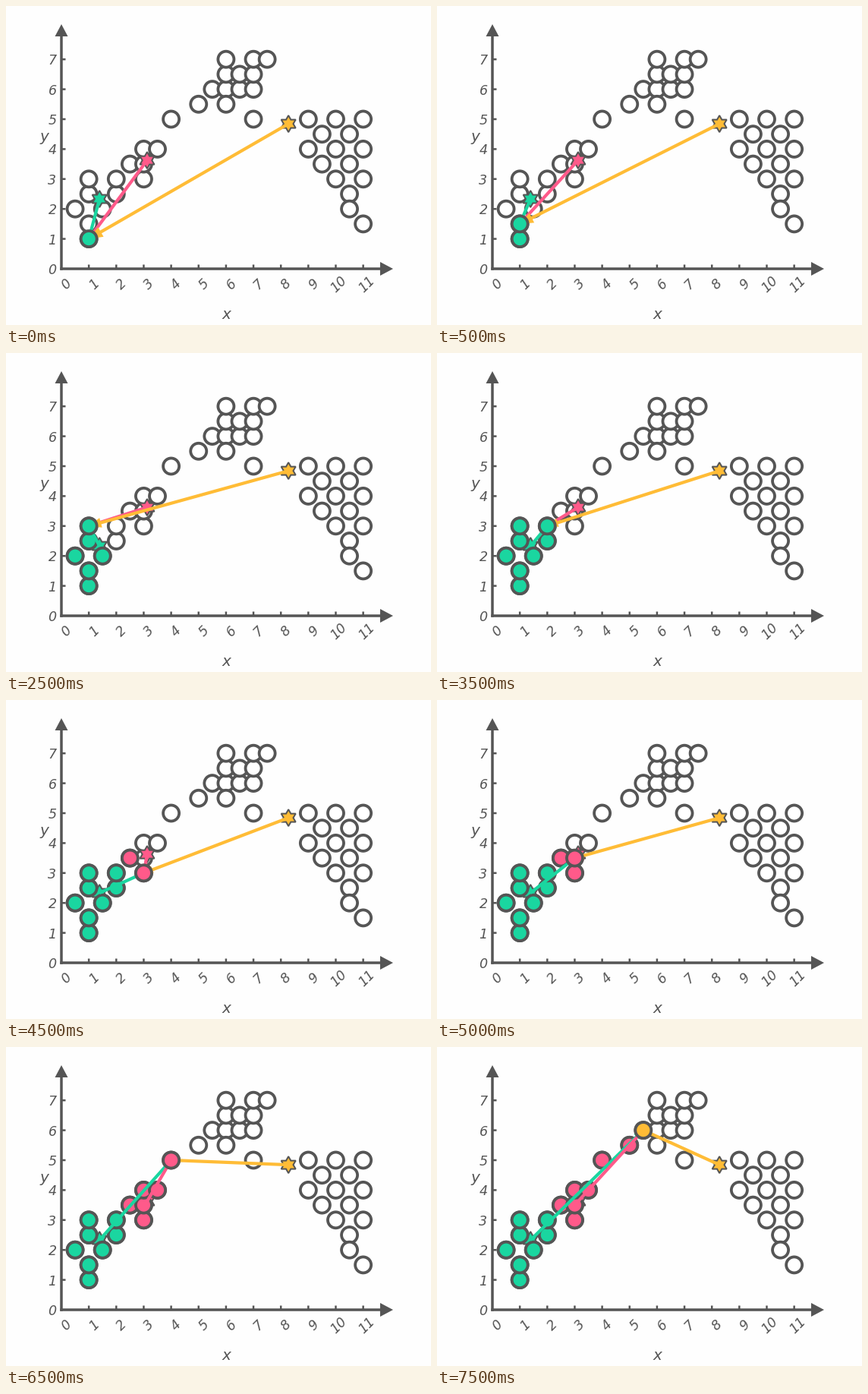
Write a matplotlib script that moves like this. It is 560 by 420 pixels and loops after 8000 ms.

```python
from itertools import product

import numpy as np
import matplotlib.pyplot as plt
from matplotlib.animation import FuncAnimation
from matplotlib.patches import Circle, Polygon

W, H, DPI = 560, 420, 100
PT = 72 / DPI
INK = "#555555"
COLORS = ["#1AD6A0", "#FF5A8A", "#FFBC36"]

fig = plt.figure(figsize=(W / DPI, H / DPI), dpi=DPI, facecolor="#FEFEFE")
ax = fig.add_axes([0, 0, 1, 1])
ax.set(xlim=(0, W), ylim=(H, 0))
ax.axis("off")


def to_px(point):
    return np.array([73, 346]) + np.array([36.15, -39.4]) * point


def write(text, x, y, size=17.5, angle=0):
    ax.text(x, y, text, fontsize=size * PT, color=INK, rotation=angle,
            family="DejaVu Sans", style="italic", ha="center",
            va="center_baseline", rotation_mode="anchor")


def bar(x0, y0, x1, y1, width):
    ax.plot([x0, x1], [y0, y1], color=INK, lw=width * PT, zorder=1,
            solid_capstyle="butt", snap=False)


def disc(point, color, z):
    return ax.add_patch(Circle(to_px(point), 10.5, fc=color, ec=INK,
                               lw=3.8 * PT, zorder=z))


def star(center, color):
    a = np.arange(12) * np.pi / 6
    r = np.where(np.arange(12) % 2, 6.3, 11)
    pts = center + np.c_[r * np.sin(a), -r * np.cos(a)]
    ax.add_patch(Polygon(pts, fc=color, ec=INK, lw=2 * PT, zorder=3))


def arrow_shape(start, end):
    """Arrow outline; the head grows with the length."""
    d = end - start
    length = np.hypot(*d)
    d = d / length
    n = np.array([-d[1], d[0]])
    neck, half = end - d * 0.06 * length, 2.1
    wing = max(half, 0.024 * length)
    return np.array([start + n * half, neck + n * half, neck + n * wing, end,
                     neck - n * wing, neck - n * half, start - n * half])


def column(x, low, high):
    return [(x, y) for y in np.arange(low, high + 0.1, 0.5)]


# Axes
bar(73, 347.7, 73, 38, 3.5)
bar(71.3, 346, 496, 346, 3.5)
for tip, along in (((73, 24), (0, 16)), ((510, 346), (-17, 0))):
    tip, along = np.array(tip), np.array(along)
    side = along[::-1] * 0.53
    ax.add_patch(Polygon([tip, tip + along + side, tip + along - side], fc=INK, lw=0))
for i in range(12):
    x, y = to_px((i, i))
    write(str(i), x + (5.5 if i < 10 else 3), 365, angle=45)
    if i:
        bar(x, 346, x, 340.5, 2.5)
    if i < 8:
        write(str(i), 61, y)
        if i:
            bar(73, y, 78.5, y, 2.5)
write("x", 290, 404, 20)
write("y", 50, 170, 20)

# Three groups on a half-unit grid
first = (column(1, 1, 1.5) + [(.5, 2), (1.5, 2)] + column(1, 2.5, 3)
         + column(2, 2.5, 3) + [(2.5, 3.5)])
second = column(3, 3, 4) + [(3.5, 4)]
link = [(4, 5), (5, 5.5), (5.5, 6)]
block = [p for p in product((6, 6.5, 7), repeat=2) if p != (6.5, 7)]
checker = [(x, y) for x, y in product(np.arange(9, 11.5, .5), np.arange(2.5, 5.5, .5))
           if (x + y) % 1 == 0 and x + y >= 13]
rest = block + [(6, 5.5), (7, 5), (7.5, 7)] + checker + [(10.5, 2), (11, 1.5)]

# Each point takes the colour of the nearest group mean
means = np.array([np.mean(g, axis=0) for g in (first, second, link + rest)])
visits = first + second + link
nearest = [np.argmin(np.hypot(*(means - p).T)) for p in visits]

for point in visits + rest:
    disc(point, "white", 2)
centers = [to_px(m) for m in means]
for center, color in zip(centers, COLORS):
    star(center, color)
filled = [disc(p, COLORS[n], 4) for p, n in zip(visits, nearest)]
arrows = [ax.add_patch(Polygon(np.zeros((7, 2)), fc=color, lw=0, zorder=5))
          for color in COLORS]


def update(k):
    for i, dot in enumerate(filled):
        dot.set_visible(i <= k)
        dot.set_zorder(6 if i == k else 4)
    for arrow, center in zip(arrows, centers):
        arrow.set_xy(arrow_shape(center, to_px(visits[k])))
    return filled + arrows


anim = FuncAnimation(fig, update, frames=len(visits), interval=500,
                     repeat=True, repeat_delay=0, blit=False)
plt.show()
```
